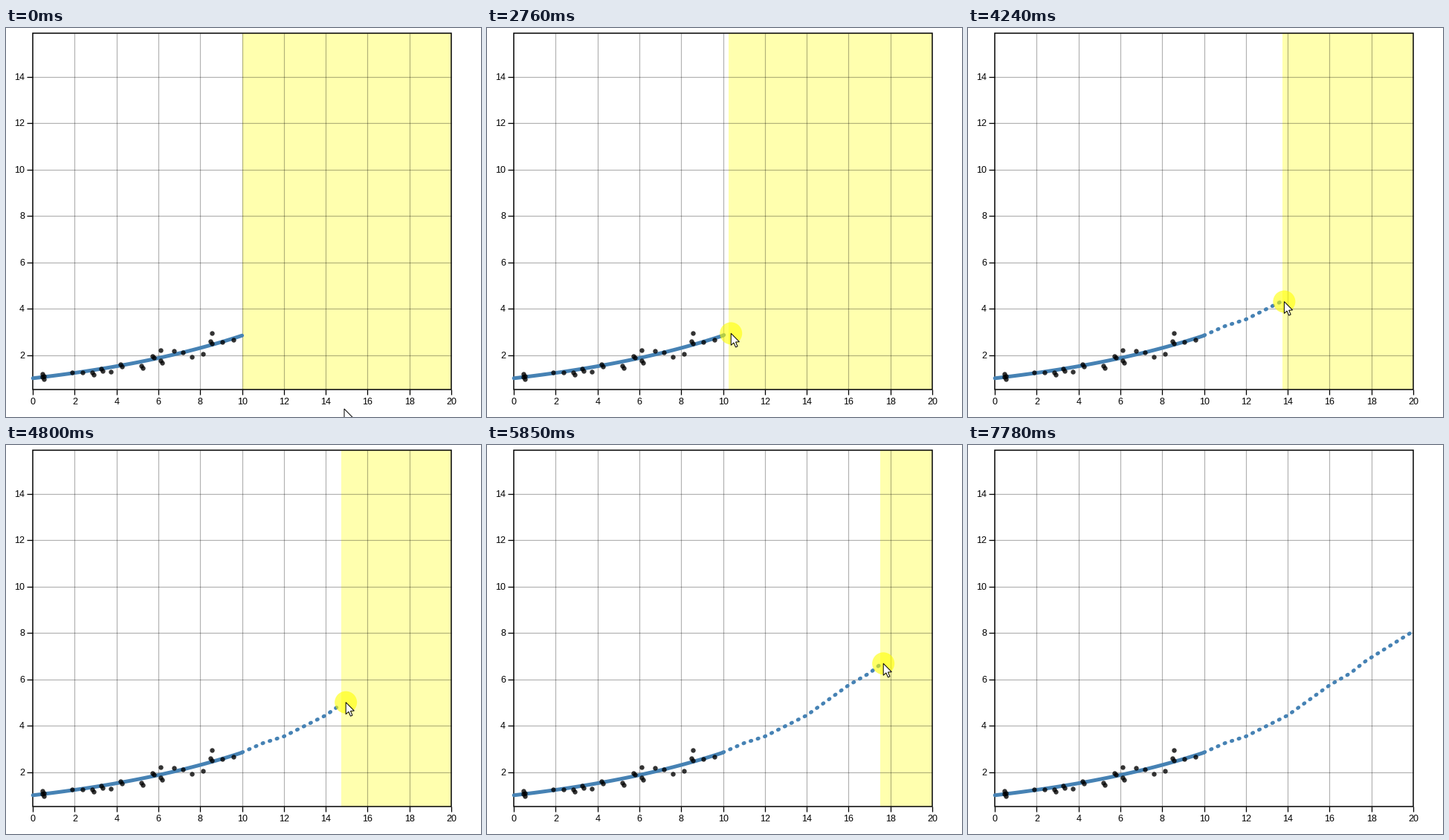
Write a matplotlib script that moves like this. It is 639 px wide and 524 px high and loops after 8.44 s.

```python
import matplotlib.pyplot as plt
import numpy as np
from matplotlib.animation import FuncAnimation
from matplotlib.collections import LineCollection
from matplotlib.patches import Circle, Polygon, Rectangle

W, H, DPI = 639, 524, 64
PX = 72 / DPI  # points per pixel
LOOP, INTERVAL, STEP = 8440, 20, 80
LEFT, RIGHT, TOP, BOTTOM = 36.2, 599, 6.8, 487.2
UNIT = (RIGHT - LEFT) / 20
BLUE = "steelblue"

# Pointer keys while free (time, px, py) and while drawing (time, x value)
FREE = [(0, 455, 513), (480, 319, 405), (720, 319, 406), (800, 318, 412),
        (1500, 318, 412), (1740, 333, 396), (1960, 319, 410),
        (2600, 319, 410), (7440, 613, 264), (7600, 602, 473),
        (7760, 632, 515)]
DRAG = [(2560, 10.03), (3360, 11.77), (4240, 13.83), (5360, 16.09),
        (6240, 18.97), (6800, 20.01)]

# Corners of the hand-drawn curve, in data units
DRAWN = [(10, 2.85), (11, 3.25), (12, 3.54), (14, 4.45), (16, 5.75),
         (17, 6.27), (17.7, 6.78), (20, 8.08)]

# Samples: lone ones, and sites where two nearly coincide
LONE = [(1.88, 1.25), (2.37, 1.24), (3.71, 1.28), (6.12, 2.21), (6.73, 2.18),
        (7.17, 2.12), (7.6, 1.91), (8.13, 2.05), (8.56, 2.95), (9.05, 2.55),
        (9.59, 2.66)]
TWIN = [(0.48, 1.14), (0.48, 1.01), (2.87, 1.21), (3.31, 1.37), (4.22, 1.55),
        (5.22, 1.5), (5.74, 1.92), (6.14, 1.72), (8.53, 2.56)]
TWIN_GAP = np.array([0.03, -0.045])

ARROW = np.array([(0, 0), (0, 16), (3.7, 12.6), (6.3, 18.6), (8.8, 17.5),
                  (6.3, 11.7), (11.2, 11.4)])


def sx(value):
    return LEFT + UNIT * value


def sy(value):
    return 503 - 31.21 * value


def along(keys, at):
    """Linear interpolation through keys; one result per extra column."""
    first, *rest = np.transpose(keys)
    return [np.interp(at, first, column) for column in rest]


fig = plt.figure(figsize=(W / DPI, H / DPI), dpi=DPI, facecolor="white")
ax = fig.add_axes([0, 0, 1, 1])
ax.set_xlim(0, W)
ax.set_ylim(H, 0)
ax.axis("off")


def segments(lines, width, z, **style):
    ax.add_collection(LineCollection(lines, linewidths=width * PX, zorder=z,
                                     colors="black", **style))


def label(x, y, value, align):
    ax.text(x, y, str(value), ha=align, va="baseline", zorder=5,
            fontfamily="Liberation Sans", fontsize=12.5 * PX)


def build_chart():
    xs, ys = range(0, 21, 2), range(2, 15, 2)
    segments([[(sx(v), TOP), (sx(v), BOTTOM)] for v in xs[1:-1]]
             + [[(LEFT, sy(v)), (RIGHT, sy(v))] for v in ys],
             1.2, 2, alpha=0.3)
    segments([[(sx(v), BOTTOM), (sx(v), BOTTOM + 7)] for v in xs]
             + [[(28, sy(v)), (LEFT, sy(v))] for v in ys], 1.3, 3)
    ax.add_patch(Rectangle((LEFT, TOP), RIGHT - LEFT, BOTTOM - TOP,
                           fill=False, ec="black", lw=1.5 * PX, zorder=3))
    for v in xs:
        label(sx(v), 506.6, v, "center")
    for v in ys:
        label(25, sy(v) + 4, v, "right")

    t = np.linspace(0, 10, 60)
    ax.plot(sx(t), sy(np.exp(0.1045 * t)), color=BLUE, lw=5 * PX,
            solid_capstyle="round", zorder=4)
    twins = np.array(TWIN)
    x, y = np.vstack([LONE, twins - TWIN_GAP, twins + TWIN_GAP]).T
    ax.scatter(sx(x), sy(y), s=(6.4 * PX) ** 2, c="black", alpha=0.8,
               linewidths=0, zorder=6)


build_chart()
veil = ax.add_patch(Rectangle((LEFT, TOP), 0, BOTTOM - TOP, fc="#ffffae",
                              lw=0, zorder=1))
dots, = ax.plot([], [], color=BLUE, lw=5 * PX, zorder=4,
                linestyle=(0, (0.25, 1.75)), dash_capstyle="round")
halo = ax.add_patch(Circle((0, 0), 15, fc="#ffff00", alpha=0.6, lw=0,
                           zorder=7))
arrow = ax.add_patch(Polygon(ARROW, fc="white", ec="black", lw=1 * PX,
                             joinstyle="miter", zorder=8))


def update(frame):
    now = frame * INTERVAL
    held = (now + 20) // STEP * STEP  # the pointer moves in steps
    reach = along(DRAG, held)[0] if held >= 2640 else 10
    if 2640 <= held < 7400:
        tip = np.array([sx(reach), sy(along(DRAWN, reach)[0]) + 2])
    else:
        tip = np.array(along(FREE, held))

    arrow.set_xy(ARROW + tip)
    arrow.set_visible(now < 7460 or 7630 <= now < 7780)
    halo.center = tip
    halo.set_visible(1180 <= now < 1500 or 2520 <= now < 7220)

    # The drawn part grows in quarter units
    edge = np.floor(reach * 4) / 4
    veil.set_x(sx(edge))
    veil.set_width(RIGHT - sx(edge))
    veil.set_visible(edge < 20)
    t = np.arange(10, edge + 0.01, 0.25)
    dots.set_data(sx(t), sy(along(DRAWN, t)[0]))
    dots.set_visible(edge > 10)
    return veil, dots, halo, arrow


anim = FuncAnimation(fig, update, frames=LOOP // INTERVAL, interval=INTERVAL,
                     repeat=True, repeat_delay=0, blit=False)
plt.show()
```
